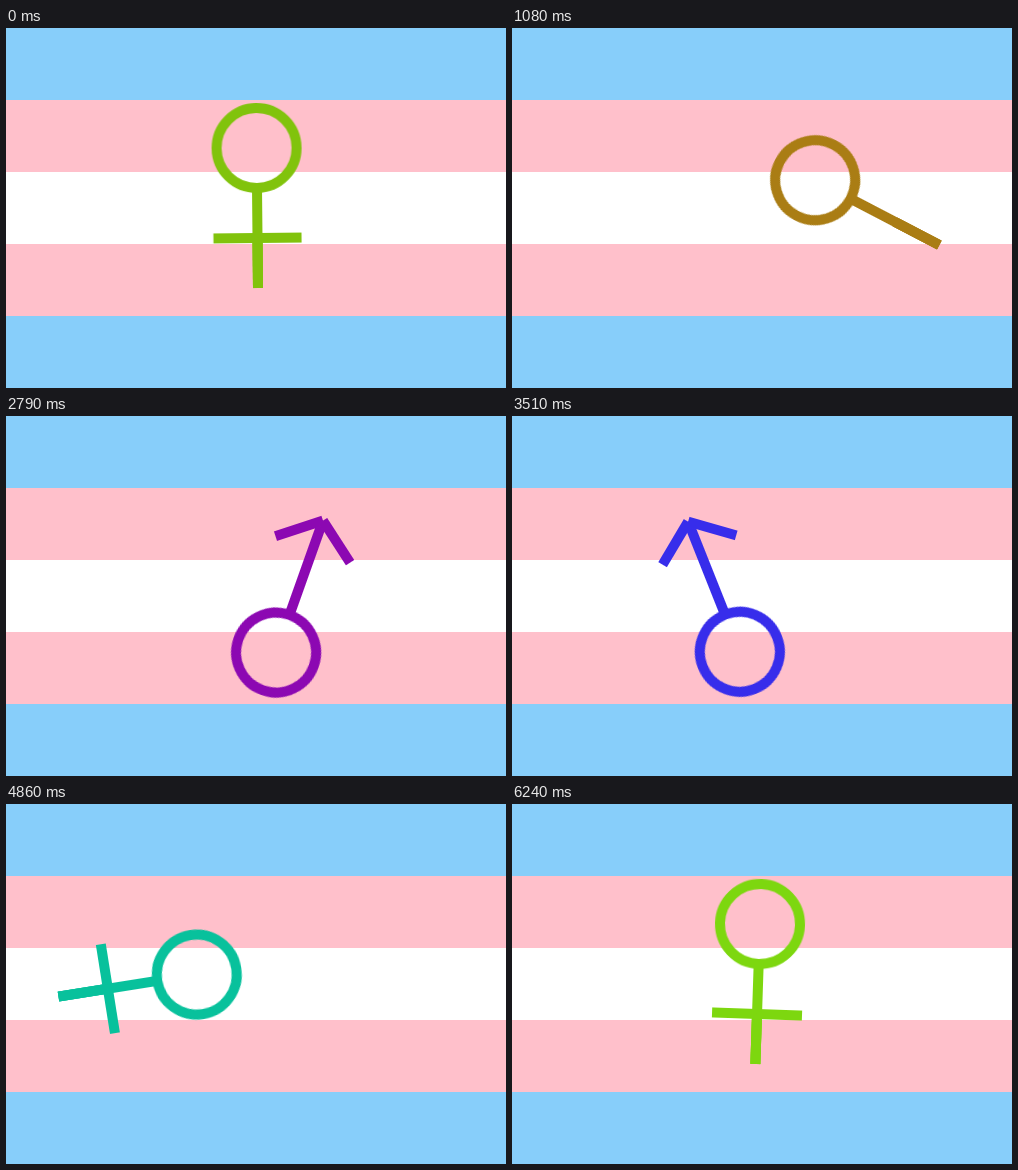
These frames come from a looping animation (500x360 px, 6270 ms). An HTML page without scripts:

```html
<!DOCTYPE html>
<html lang="en">
<head>
<meta charset="utf-8">
<title>Turning symbol</title>
<style>
  html, body { margin: 0; width: 100%; height: 100%; overflow: hidden; }
  svg { display: block; width: 500px; height: 360px; }

  .symbol, .bar, .arm { animation: 6270ms linear infinite; }
  .symbol {
    fill: none;
    stroke-width: 10;
    animation-name: orbit, tint;
    animation-timing-function: steps(209), linear;
    animation-delay: -3ms, 0s;
  }
  .bar { animation-name: bar; }
  .left { animation-name: open; --side: 1; }
  .right { animation-name: open; --side: -1; }
  .arm { --spread: calc(var(--side) * 52.4deg); }

  /* The ring circles clockwise while the stem turns the other way. */
  @keyframes orbit {
    from { transform: translate(250px, 180px) rotate(.01rad) translate(0, -60px) rotate(-.02rad); }
    to { transform: translate(250px, 180px) rotate(6.28rad) translate(0, -60px) rotate(-12.56rad); }
  }

  @keyframes bar {
    0% { transform: scaleX(.981); }
    8.19%, 58.3% { transform: scaleX(0); }
    66.65%, 100% { transform: scaleX(1); }
  }

  @keyframes open {
    0%, 24.89% { transform: rotate(0deg); }
    33.24%, 66.65% { transform: rotate(var(--spread)); }
    75%, 100% { transform: rotate(0deg); }
  }

  @keyframes tint {
    0% { stroke: rgb(129, 195, 12); }
    8.6% { stroke: rgb(164, 168, 10); }
    17.22% { stroke: rgb(170, 125, 20); }
    25.1% { stroke: rgb(222, 56, 48); }
    33.01% { stroke: rgb(240, 10, 85); }
    40.7% { stroke: rgb(168, 4, 152); }
    48.3% { stroke: rgb(112, 11, 203); }
    55.98% { stroke: rgb(55, 45, 235); }
    62.4% { stroke: rgb(25, 90, 233); }
    68.9% { stroke: rgb(5, 140, 215); }
    77.4% { stroke: rgb(8, 193, 157); }
    85.65% { stroke: rgb(30, 220, 95); }
    92.5% { stroke: rgb(69, 227, 48); }
    99.52%, 100% { stroke: rgb(125, 215, 15); }
  }
</style>
</head>
<body>
<svg viewBox="0 0 500 360" width="500" height="360">
  <rect width="500" height="360" fill="#87cefa"/>
  <rect y="72" width="500" height="216" fill="#ffc0cb"/>
  <rect y="144" width="500" height="72" fill="#fff"/>

  <g class="symbol">
    <circle r="40"/>
    <path d="M0 40V140"/>
    <g transform="translate(0 90)">
      <path class="bar" d="M-45 0H45"/>
    </g>
    <g transform="translate(0 140)">
      <path class="arm left" d="M0 0V-50"/>
      <path class="arm right" d="M0 0V-50"/>
    </g>
  </g>
</svg>
</body>
</html>
```
